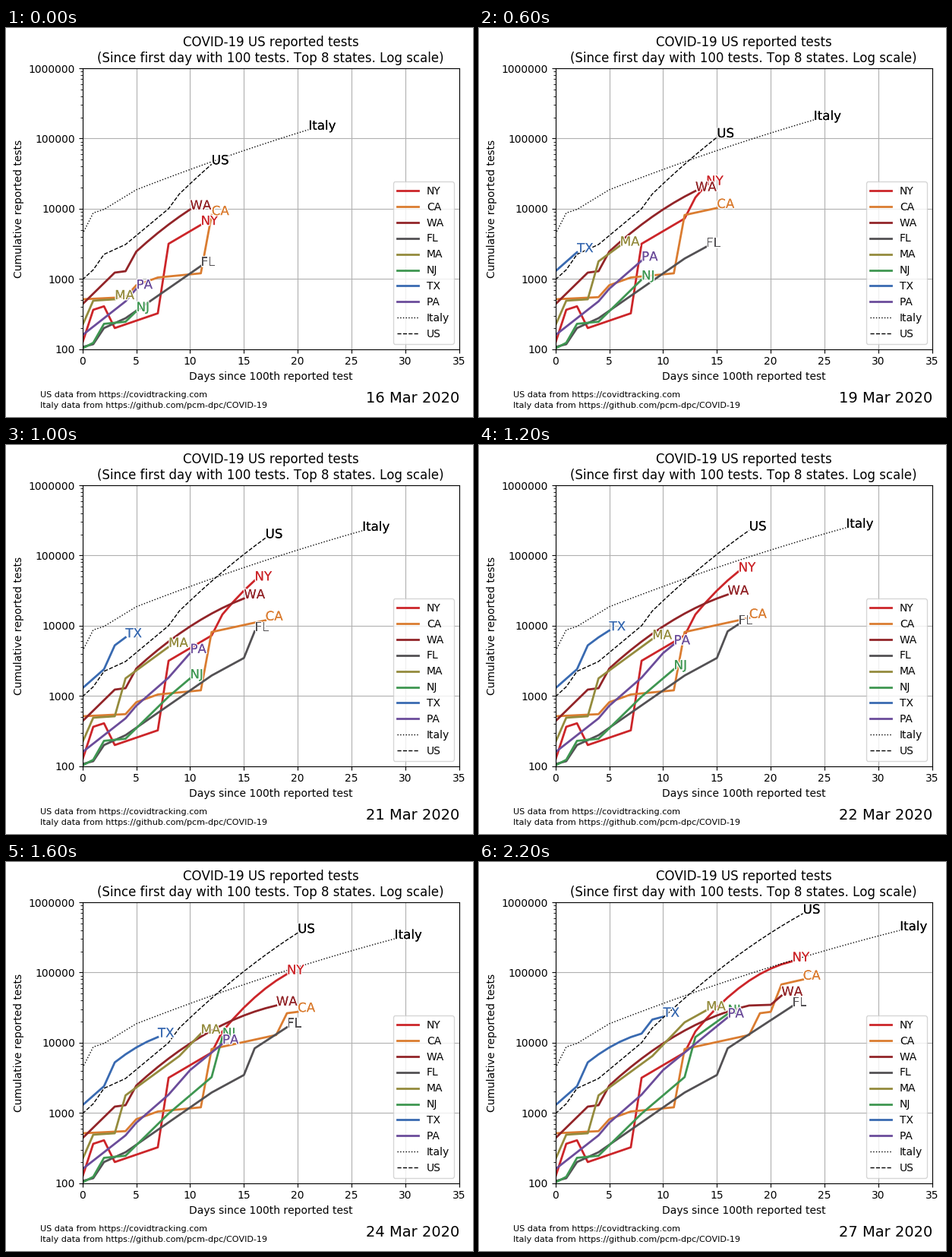
These frames come from a looping animation (615 px wide and 512 px high, 4.8 s). A matplotlib script:

```python
import numpy as np
import matplotlib.pyplot as plt
import matplotlib.patheffects as pe
from matplotlib.animation import FuncAnimation
from matplotlib.ticker import FormatStrFormatter

W, H, DPI = 615, 512, 100
STEPS = 12            # 16 to 27 March, one day per step
FRAMES, INTERVAL = 24, 200
BLACK = "#000000"

plt.rcParams["font.family"] = "DejaVu Sans"
plt.rcParams["text.kerning_factor"] = 6
fig = plt.figure(figsize=(W / DPI, H / DPI), dpi=DPI, facecolor="white")
ax = fig.add_axes([100.72 / W, 89.35 / H, 496 / W, 369.6 / H])
ax.set_yscale("log")
ax.set_xlim(0, 35)
ax.set_ylim(100, 1e6)
ax.yaxis.set_major_formatter(FormatStrFormatter("%d"))
ax.grid(True)
ax.set_title("COVID-19 US reported tests\n"
             "(Since first day with 100 tests. Top 8 states. Log scale)")
ax.set_xlabel("Days since 100th reported test")
ax.set_ylabel("Cumulative reported tests")

series = []


def growth(keys):
    """Daily counts through (day, log10 count[, bow]) key points.

    A stretch is exponential growth; bow lifts its middle, for growth
    that slows down.
    """
    levels = [keys[0][1]]
    for (d0, a, *_), (d1, b, *bow) in zip(keys, keys[1:]):
        u = np.arange(1, d1 - d0 + 1) / (d1 - d0)
        levels.extend(a + (b - a) * u + 4 * sum(bow) * u * (1 - u))
    return 10 ** np.array(levels)


def add(name, color, *keys, style="-", width=2):
    """Register one curve with a haloed label at its tip."""
    line, = ax.plot([], [], style, color=color, lw=width, label=name)
    halo = [pe.withStroke(linewidth=2, foreground="white"), pe.Normal()]
    tag = ax.text(0, 100, name, color=color, fontsize=12, path_effects=halo)
    series.append((line, tag, growth(keys)))


add("NY", "#CC2529", (0, 2.09), (1, 2.56), (2, 2.61), (3, 2.3), (7, 2.51),
    (8, 3.5), (12, 3.86), (13, 4.16), (22, 5.16, 0.17))
add("CA", "#DA7C30", (0, 2.71), (4, 2.74), (5, 2.91), (7, 3.02), (11, 3.08),
    (12, 3.91), (18, 4.11), (19, 4.42), (20, 4.44), (21, 4.83), (23, 4.9))
add("WA", "#922428", (0, 2.64), (3, 3.09), (4, 3.11), (5, 3.39),
    (18, 4.53, 0.17), (20, 4.54), (21, 4.67))
add("FL", "#535154", (0, 2.03), (1, 2.07), (2, 2.3), (4, 2.44), (12, 3.29),
    (15, 3.54), (16, 3.92), (22, 4.52))
add("MA", "#948B3D", (0, 2.34), (1, 2.69), (3, 2.71), (4, 3.25), (9, 3.81),
    (12, 4.29), (14, 4.46))
add("NJ", "#3E9651", (0, 2.01), (1, 2.09), (2, 2.36), (4, 2.39), (8, 2.99),
    (12, 3.51), (13, 4.08), (16, 4.41))
add("TX", "#396AB1", (0, 3.11), (2, 3.38), (3, 3.72), (8, 4.13, 0.05),
    (9, 4.33), (10, 4.37))
add("PA", "#6B4C9A", (0, 2.2), (4, 2.68), (5, 2.86), (8, 3.26), (10, 3.61),
    (16, 4.36))
add("Italy", BLACK, (0, 3.64), (1, 3.94), (2, 3.99), (5, 4.27),
    (32, 5.6, 0.07), style=":", width=1)
add("US", BLACK, (0, 2.99), (1, 3.13), (2, 3.35), (4, 3.49), (8, 4.0),
    (9, 4.21), (23, 5.84, 0.11), style="--", width=1)

ax.legend(loc="lower right")


def note(x, y, text, **style):
    return fig.text(x / W, 1 - y / H, text, **style)


note(45, 486, "US data from https://covidtracking.com", fontsize=8)
note(45, 500, "Italy data from https://github.com/pcm-dpc/COVID-19",
     fontsize=8)
date = note(597, 493, "", fontsize=14, ha="right")


def draw(frame):
    step = min(frame, STEPS - 1)
    date.set_text(f"{16 + step} Mar 2020")
    for line, tag, counts in series:
        n = len(counts) - STEPS + 1 + step
        line.set_data(range(n), counts[:n])
        tag.set_visible(n > 0)
        if n:
            tag.set_position((n - 1, counts[n - 1]))
    return []


anim = FuncAnimation(fig, draw, frames=FRAMES, interval=INTERVAL,
                     init_func=lambda: draw(0), repeat=True, repeat_delay=0)
plt.show()
```
